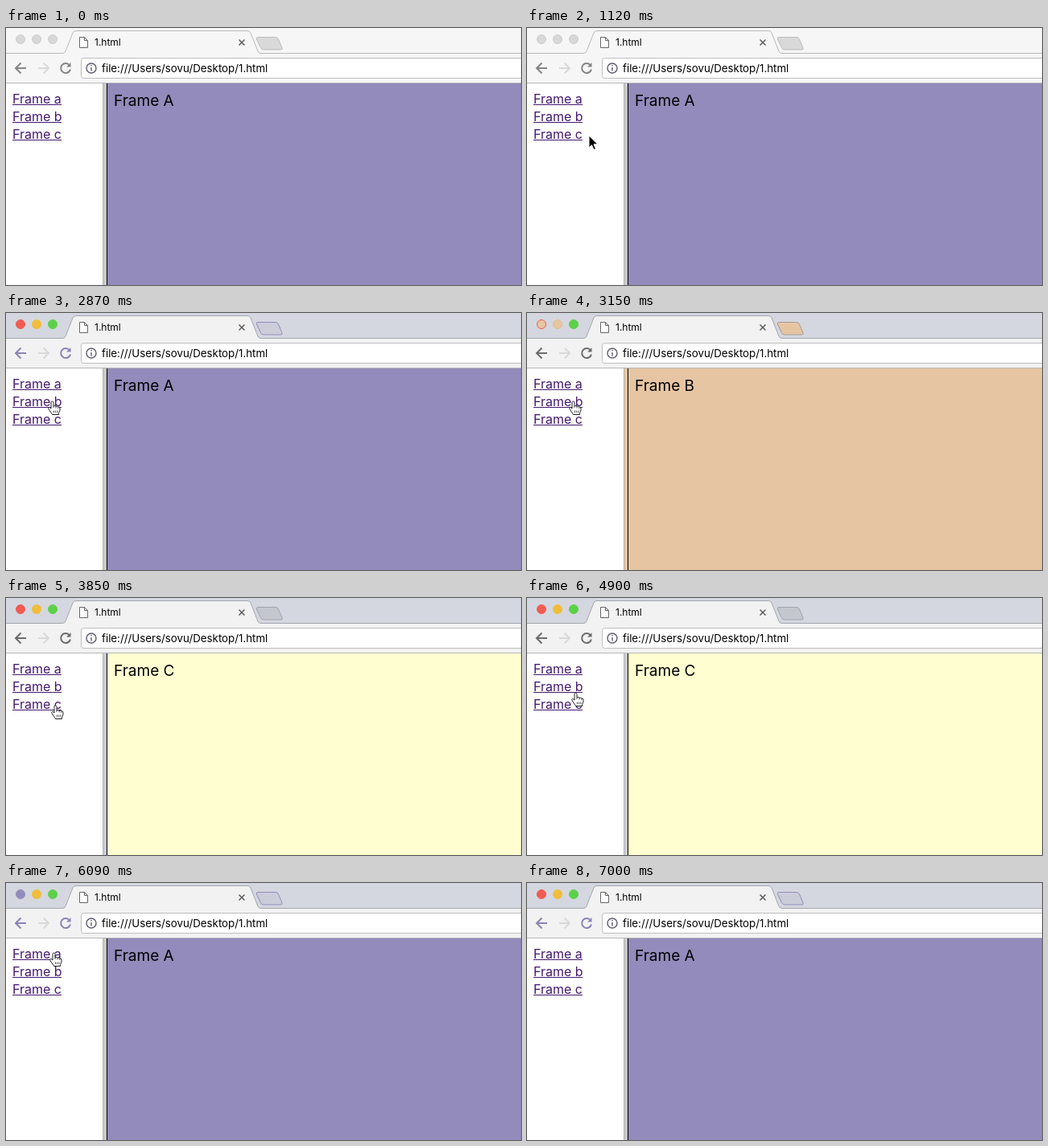
Animation, 640 px wide and 320 px high, one loop 7070 ms. Source, as an HTML page:

```html
<!DOCTYPE html>
<html lang="en">
<head>
<meta charset="utf-8">
<title>Frames</title>
<style>
html, body { margin: 0; width: 100%; height: 100%; overflow: hidden; background: #fff; }
svg { display: block; width: 640px; height: 320px; }
text { font-family: Inter, Roboto, sans-serif; fill: #000; }
.link text { font-size: 16px; fill: #45196f; }
.link rect { fill: #45196f; }
#title { font-size: 19px; }
</style>
</head>
<body>
<svg viewBox="0 0 640 320">
  <rect id="strip" width="640" height="32"/>
  <rect id="bar" y="32" width="640" height="37"/>
  <path id="tab" d="M0 31.5H70Q73 31.5 74 29L83 6Q84 3.5 87 3.5H300Q303 3.5 304 6L313 29Q314 31.5 317 31.5H640V33H0Z"/>
  <path id="edge" fill="none" d="M0 31.5H70Q73 31.5 74 29L83 6Q84 3.5 87 3.5H300Q303 3.5 304 6L313 29Q314 31.5 317 31.5H640"/>
  <path id="plus" d="M313 11.5H335Q337.500 11.500 338.500 14L343 24.500Q344 27 341.500 27H320Q317.500 27 316.500 24.500L311.500 14Q310.500 11.500 313 11.500Z"/>
  <g id="lights">
    <circle cx="18" cy="14" r="5.5"/><circle cx="38" cy="14" r="5.5"/><circle cx="58" cy="14" r="5.5"/>
  </g>
  <path d="M91.500 11.500H97.500L101.500 15.500V24.500H91.500ZM97.500 11.500V15.500H101.500" fill="#fff" stroke="#666"/>
  <text x="110" y="22" font-size="12">1.html</text>
  <path d="M289.500 14.500L296.500 21.500M296.500 14.500L289.500 21.500" stroke="#5c5c5c" stroke-width="1.5"/>

  <g id="nav" fill="none" stroke-width="2">
    <path d="M25 50H12.500M18.500 43.500L12 50L18.500 56.500"/>
    <path d="M79 46.500A6 6 0 1 0 80 51.500"/>
    <path d="M80.500 43V48.500H75Z" stroke="none" id="tip"/>
  </g>
  <path d="M40 50H52.500M46.500 43.500L53 50L46.500 56.500" fill="none" stroke="#d9d9d9" stroke-width="2"/>
  <rect x="93.500" y="37.500" width="560" height="25" rx="3" fill="#fff" stroke="#bdbdbd"/>
  <g fill="none" stroke="#5d5b70" stroke-width="1.400">
    <circle cx="106" cy="50" r="6"/><path d="M106 49V53.500M106 46V47.500"/>
  </g>
  <text x="119" y="55" font-size="13.300">file:///Users/sovu/Desktop/1.html</text>
  <rect y="68" width="640" height="1" fill="#b8b8b8"/>

  <rect y="69" width="120" height="251" fill="#fff"/>
  <g id="links"></g>
  <rect id="split" x="120" y="69" width="5" height="251"/>
  <rect x="120" y="69" width="1" height="251" fill="#b4b4b4"/>
  <rect x="125" y="69" width="1" height="251" fill="#000"/>
  <rect id="page" x="126" y="69" width="514" height="251"/>
  <text id="title" x="134" y="97"></text>

  <g id="cursor">
    <path id="arrow" d="M0 0V15L3.500 11.800L6 17.500L8.500 16.500L6 10.800H11Z" fill="#000" stroke="#fff"/>
    <g id="hand" stroke="#222">
      <path fill="#fff" d="M-2 1.500Q-2 0 -.5 0Q1 0 1 1.500V6Q3 4.600 4 6.300Q6 5.200 6.600 7Q9 6.300 9 9V11Q8.500 13 7.500 14.500V16.500H-.5Q-1 15 -2.800 13L-5 9.600Q-5.800 8 -4.500 7.600Q-3 7.400 -2 9Z"/>
      <path d="M1 6V8M4 6.500V8.500M6.600 7.500V9M1.500 11.500V14M3.700 11.500V14M5.900 11.500V14" stroke-width=".8"/>
    </g>
  </g>
</svg>
<script>
const LOOP = 7070, STEP = 70;
const $ = id => document.getElementById(id);
const set = (el, attrs) => { for (const k in attrs) el.setAttribute(k, attrs[k]); };

const pages = {
  A: { page: '#928bbb', split: '#c9c9c9', nav: '#8a84b8', plus: '#cbcdd9', rim: '#928bbb' },
  B: { page: '#e6c5a3', split: '#e6c5a3', nav: '#6d6d6d', plus: '#e6c5a3', rim: '#a09a94' },
  C: { page: '#fffed0', split: '#cacad0', nav: '#6d6d6d', plus: '#c4c7ce', rim: '#a0a3aa' }
};
const idle = { ...pages.A, nav: '#858585', plus: '#d9d9d9', rim: '#bcbcbc' };

const [RED, AMBER, GREEN, GRAY, TAN] = ['#f05b54', '#f0bd3c', '#5dd04a', '#d8d8d8', '#e6c5a3'];
const normal = [RED, AMBER, GREEN];
const tan = [TAN, TAN, GREEN];
// time, page, light colours
const scenes = [
  [0, 'A', null],
  [1680, 'A', normal],
  [3010, 'B', tan],
  [3710, 'C', normal],
  [5180, 'B', tan],
  [6020, 'A', ['#928bbb', AMBER, GREEN]],
  [6860, 'A', normal]
];
// time, x, y of the pointer
const path = [
  [70, 118, 217], [700, 84, 146], [980, 80, 140], [1610, 55, 89], [2240, 55, 89],
  [2730, 58, 110], [3220, 58, 110], [3570, 62, 134], [4690, 62, 134], [5040, 60, 109],
  [5530, 60, 109], [5880, 60, 87], [6160, 60, 87], [6580, 203, 281], [6650, 255, 304]
];
const LEAVE = 6160, GONE = 6720;

$('links').innerHTML = ['a', 'b', 'c'].map((c, i) =>
  `<g class="link" transform="translate(8 ${94 + 22 * i})"><text>Frame ${c}</text><rect y="1" width="61" height="1"/></g>`).join('');

function pointAt(t) {
  const i = path.findLastIndex(p => p[0] <= t);
  const a = path[i], b = path[i + 1] || a;
  const u = a === b ? 0 : (t - a[0]) / (b[0] - a[0]);
  const k = a[0] >= LEAVE ? u * u : u * u * (3 - 2 * u);
  return [a[1] + (b[1] - a[1]) * k, a[2] + (b[2] - a[2]) * k].map(Math.round);
}

function drawWindow([, name, lights]) {
  const look = lights ? pages[name] : idle;
  const line = lights ? '#a3a6ad' : '#b9b9b9';
  set($('strip'), { fill: lights ? '#d4d7df' : '#f6f6f6' });
  for (const id of ['bar', 'tab']) set($(id), { fill: lights ? '#f2f2f2' : '#f6f6f6' });
  set($('edge'), { stroke: line });
  set($('plus'), { fill: look.plus, stroke: look.rim });
  set($('nav'), { stroke: look.nav });
  set($('tip'), { fill: look.nav });
  set($('split'), { fill: look.split });
  set($('page'), { fill: look.page });
  $('title').textContent = 'Frame ' + name;
  [...$('lights').children].forEach((dot, i) => {
    const fill = lights ? lights[i] : GRAY;
    const rim = !lights ? '#cdcdcd' : fill === TAN ? [RED, '#e2bd8b'][i] : fill;
    set(dot, { fill, stroke: rim });
  });
}

function drawCursor(t) {
  const shown = t >= path[0][0] && t < GONE;
  const hand = t >= 2240 && t <= LEAVE;
  $('cursor').style.display = shown ? '' : 'none';
  $('hand').style.display = hand ? '' : 'none';
  $('arrow').style.display = hand ? 'none' : '';
  if (shown) set($('cursor'), { transform: `translate(${pointAt(t)})` });
}

const start = performance.now();
function tick() {
  const now = Math.max(0, performance.now() - start) % LOOP;
  const t = Math.floor(now / STEP) * STEP;
  drawWindow(scenes.findLast(s => s[0] <= t));
  drawCursor(t);
  requestAnimationFrame(tick);
}
tick();
</script>
</body>
</html>
```
